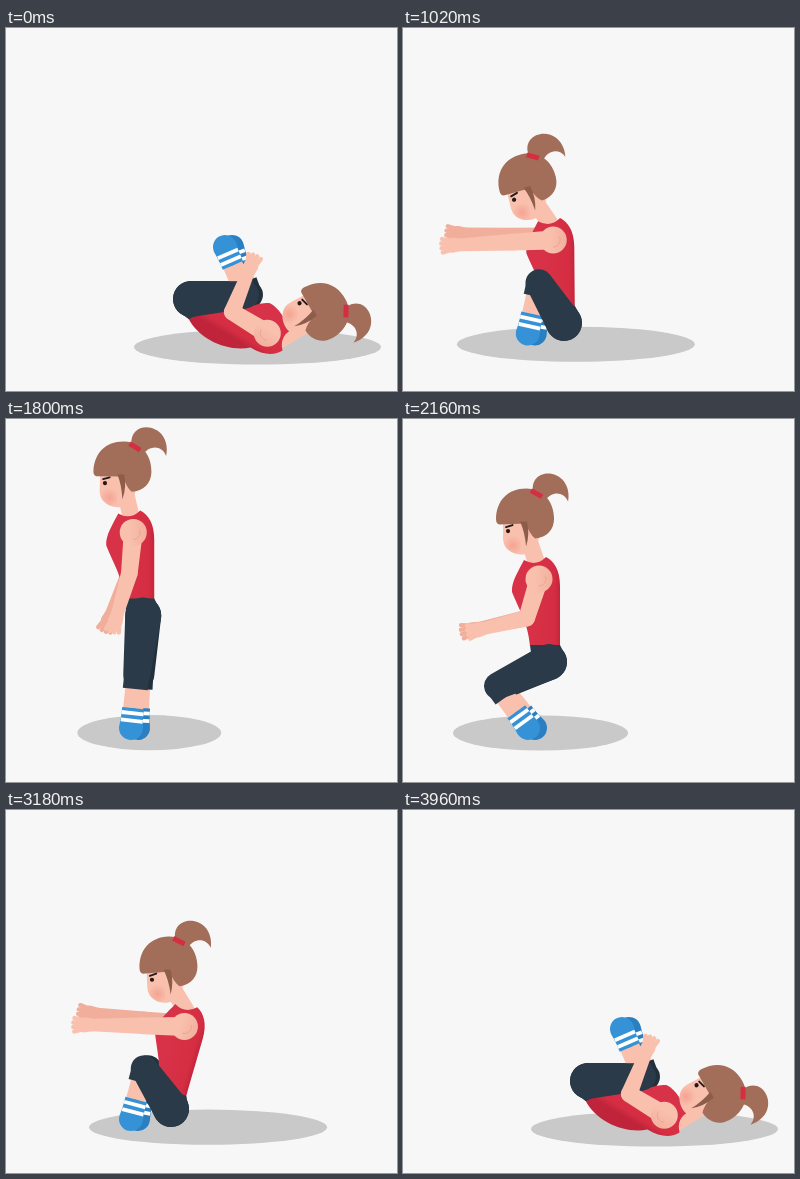
An HTML page with a canvas for the animation above (3990 ms loop, 391 by 363 pixels).

```html
<!DOCTYPE html>
<html lang="en">
<head>
<meta charset="utf-8">
<title>Roll-up squat</title>
<style>
html, body { margin: 0; width: 100%; height: 100%; overflow: hidden; background: #f7f7f7; }
canvas { display: block; }
</style>
</head>
<body>
<canvas id="stage" width="391" height="363"></canvas>
<script>
const ctx = document.getElementById('stage').getContext('2d');
const LOOP = 3990, TAU = Math.PI * 2, DEG = Math.PI / 180;
const SKIN = '#f9c0ae', SKIN_DARK = '#f0ae9b', HAIR = '#a26e5a', RED = '#d52e43',
      PANTS = '#2a3a48', PANTS_DARK = '#22303c', BLUE = '#3592d6', BLUE_DARK = '#2a7fc2';

// Each pose: hip, lean and neck in degrees, foot, wrist, shadow ends.
const pose = (hip, lean, neck, foot, wrist, shadow) =>
  [...hip, lean * DEG, neck * DEG, ...foot, ...wrist, ...shadow];
const planted = [125, 309];

const lie   = pose([185, 271], 121,  -22, [219, 219], [242, 245], [128, 375]);
const roll  = pose([170, 300],  74,  -45, [122, 249], [193, 237], [75, 321]);
const sit   = pose([159, 293],  -5, -119, planted,    [47, 211],  [53, 285]);
const reach = pose([147, 242],  -3, -109, planted,    [42, 157],  [70, 237]);
const stand = pose([137, 195],   0, -100, planted,    [112, 192], [72, 215]);
const squat = pose([146, 243],   0, -103, planted,    [83, 209],  [50, 225]);
const perch = pose([165, 299],  16, -105, planted,    [86, 215],  [83, 321]);
const rollBack = roll.map((v, i) => [0, 4, 6, 8, 9].includes(i) ? v + 18 : v);

const timeline = [
  [0, lie], [660, roll], [1090, sit], [1440, reach], [1760, stand], [2160, squat],
  [2430, reach], [2820, sit], [3180, perch], [3420, rollBack], [3880, lie], [LOOP, lie]
];

const clamp = (v, lo, hi) => Math.min(hi, Math.max(lo, v));
const angleTo = (p, q) => Math.atan2(q[1] - p[1], q[0] - p[0]);
const distance = (p, q) => Math.hypot(q[0] - p[0], q[1] - p[1]);
const shift = ([x, y], dx, dy = 0) => [x + dx, y + dy];

// Tangent at key k: zero at turning points and at the ends.
function tangent(k, i) {
  if (k === 0 || k === timeline.length - 1) return 0;
  const slope = j => (timeline[j + 1][1][i] - timeline[j][1][i]) / (timeline[j + 1][0] - timeline[j][0]);
  const a = slope(k - 1), b = slope(k);
  return a * b <= 0 ? 0 : 2 * a * b / (a + b);
}

function poseAt(t) {
  const k = timeline.findLastIndex(key => key[0] <= t);
  const [t0, from] = timeline[k], [t1, to] = timeline[k + 1];
  const d = t1 - t0, u = (t - t0) / d, s = u * u * (3 - 2 * u);
  return from.map((v, i) => v + (to[i] - v) * s +
    d * u * (1 - u) * (tangent(k, i) * (1 - u) - tangent(k + 1, i) * u));
}

function place([x, y], angle, [ox, oy]) {
  const c = Math.cos(angle), s = Math.sin(angle);
  return [ox + x * c - y * s, oy + x * s + y * c];
}

// Middle joint of a two-part limb from p to q.
function joint(p, q, upper, lower, side) {
  const d = distance(p, q);
  const bend = Math.acos(clamp((upper ** 2 + d * d - lower ** 2) / (2 * upper * d), -1, 1));
  return place([upper, 0], angleTo(p, q) + side * bend, p);
}

// Rounded limb whose radius runs from r1 to r2.
function limb(p, r1, q, r2, fill) {
  const a = angleTo(p, q), o = Math.acos(clamp((r1 - r2) / distance(p, q), -1, 1));
  ctx.fillStyle = fill;
  ctx.beginPath();
  ctx.arc(...p, r1, a + o, a - o + TAU);
  ctx.arc(...q, r2, a - o, a + o);
  ctx.fill();
}

function disc(p, r, fill) {
  ctx.fillStyle = fill;
  ctx.beginPath();
  ctx.arc(...p, r, 0, TAU);
  ctx.fill();
}

function line(p, q, width, color, cap = 'round') {
  ctx.strokeStyle = color;
  ctx.lineWidth = width;
  ctx.lineCap = cap;
  ctx.beginPath();
  ctx.moveTo(...p);
  ctx.lineTo(...q);
  ctx.stroke();
}

function local(origin, angle, draw) {
  ctx.save();
  ctx.translate(...origin);
  ctx.rotate(angle);
  draw();
  ctx.restore();
}

function shape(d, fill) {
  ctx.fillStyle = fill;
  ctx.fill(new Path2D(d));
}

function arm(shoulder, elbow, wrist, color) {
  limb(shoulder, 9.5, elbow, 8.3, color);
  limb(elbow, 8.3, wrist, 6.3, color);
  local(wrist, angleTo(elbow, wrist), () => {
    limb([0, 0], 6.3, [8, 0], 7.5, color);
    for (const a of [-0.36, -0.12, 0.12, 0.36]) {
      line([6, a * 10], [19 * Math.cos(a), 19 * Math.sin(a)], 4.4, color);
    }
  });
}

function leg(hip, knee, foot, sock, cloth) {
  const down = angleTo(knee, foot);
  local(foot, down + Math.PI, () => {
    line([12, 0], [distance(knee, foot), 0], 20, SKIN, 'butt');
    limb([0, 0], 12, [9, 0], 11, sock);
    line([6, 0], [20, 0], 22, sock, 'butt');
    ctx.fillStyle = '#fff';
    for (const x of [5.5, 13]) ctx.fillRect(x, -11, 3.8, 22);
  });
  line(knee, place([14, 0], down, knee), 25, cloth, 'butt');
  limb(hip, 18, knee, 13.5, cloth);
}

function head(origin, angle) {
  local(origin, angle, () => {
    shape('M-22 0V20C-22 31-12 36-4 36C8 36 15 26 14 13L10 0Z', SKIN);
    const blush = ctx.createRadialGradient(-12, 27, 0, -12, 27, 10);
    blush.addColorStop(0, 'rgba(240,120,105,.4)');
    blush.addColorStop(1, 'rgba(240,120,105,0)');
    shape('M-22 14V20C-22 31-12 36-4 36V14Z', blush);
    shape('M8-27C5-46 28-51 39-37C44-30 44-22 43-17C39-27 27-28 20-18Z', HAIR);
    shape('M-29 1C-29-18-17-30 1-30C18-30 29-17 29 0C29 11 22 19 10 20Q4 15 1 5L-26 6Q-29 5-29 1Z', HAIR);
    shape('M-5 3Q0 14 1 28Q5 16 2 3Z', '#8d5d4b');
    line([6, -28], [17, -22], 5, RED, 'butt');
    disc([-17, 12.5], 2.1, '#241a1a');
    line([-19, 8.5], [-12.5, 6.5], 1.9, '#241a1a');
  });
}

// The curl bends the pelvis away from the chest and rounds the back.
function torso(hip, lean, curl) {
  const up = (x, y) => place([x, y], lean, hip);
  const low = (x, y) => place([x, y], lean + curl, hip);
  const back = 11 + curl * 28;
  const shade = ctx.createLinearGradient(...up(-22, -70), ...up(12, -70));
  shade.addColorStop(0, '#d83248');
  shade.addColorStop(0.8, RED);
  shade.addColorStop(1, '#c0243b');
  ctx.fillStyle = shade;
  ctx.beginPath();
  ctx.moveTo(...low(-19, -16));
  ctx.bezierCurveTo(...low(-21, -40), ...up(-30, -52), ...up(-37, -70));
  ctx.bezierCurveTo(...up(-38, -80), ...up(-30, -92), ...up(-25, -102));
  ctx.quadraticCurveTo(...up(-13, -95), ...up(-3, -105));
  ctx.bezierCurveTo(...up(5, -101), ...up(11, -92), ...up(11, -76));
  ctx.bezierCurveTo(...up(back, -58), ...low(11, -40), ...low(11, -16));
  ctx.fill();

  ctx.fillStyle = PANTS;
  ctx.beginPath();
  for (const p of [[-19, -17], [11, -17], [17, -5], [0, 12], [-16, 6]]) ctx.lineTo(...low(...p));
  ctx.fill();
}

function shoulderCap(p, lean) {
  const glow = ctx.createLinearGradient(...place([-4, 0], lean, p), ...place([14, 0], lean, p));
  glow.addColorStop(0, SKIN);
  glow.addColorStop(1, '#f3b09d');
  disc(p, 13.5, glow);
  ctx.strokeStyle = '#eba693';
  ctx.lineWidth = 1;
  ctx.beginPath();
  ctx.arc(...p, 7, lean - 0.5, lean + 1.6);
  ctx.stroke();
}

function shadow(left, right) {
  ctx.fillStyle = '#c9c9c9';
  ctx.beginPath();
  ctx.ellipse((left + right) / 2, 314 + (right - 225) / 30, (right - left) / 2, 17.6, 0, 0, TAU);
  ctx.fill();
}

function frame() {
  const [hx, hy, lean, neck, fx, fy, wx, wy, left, right] = poseAt(performance.now() % LOOP);
  const hip = [hx, hy], foot = [fx, fy], wrist = [wx, wy];
  const curl = Math.max(0, lean - 75 * DEG) * 0.7;
  const shoulder = place([-10, -83], lean, hip);
  const skull = place([62 - 12 * curl, 0], neck, shoulder);
  const tilt = neck + 103 * DEG, nod = tilt * (tilt < 0 ? 1.2 : 0.77);
  const elbow = joint(shoulder, wrist, 41, 42, -1);
  // A folded leg turns toward the viewer, so the thigh looks shorter.
  const knee = joint(hip, foot, Math.min(60, 36 + 0.3 * distance(hip, foot)), 52, 1);
  const stretch = clamp((shoulder[0] - wx - 60) / 30, 0, 1);

  ctx.fillStyle = '#f7f7f7';
  ctx.fillRect(0, 0, 391, 363);
  shadow(left, right);

  arm(shift(shoulder, -8 * stretch, -3 * stretch), shift(elbow, 0, -6 * stretch),
      shift(wrist, 11 * stretch - 6, -11 * stretch), SKIN_DARK);
  leg(hip, shift(knee, 4), shift(foot, 7), BLUE_DARK, PANTS_DARK);

  line(place([5, 25], nod, skull), place([-12, -98], lean, hip), 17, SKIN);
  torso(hip, lean, curl);
  head(skull, nod);
  leg(hip, knee, foot, BLUE, PANTS);
  arm(shoulder, elbow, wrist, SKIN);
  shoulderCap(shoulder, lean);

  requestAnimationFrame(frame);
}
requestAnimationFrame(frame);
</script>
</body>
</html>
```
